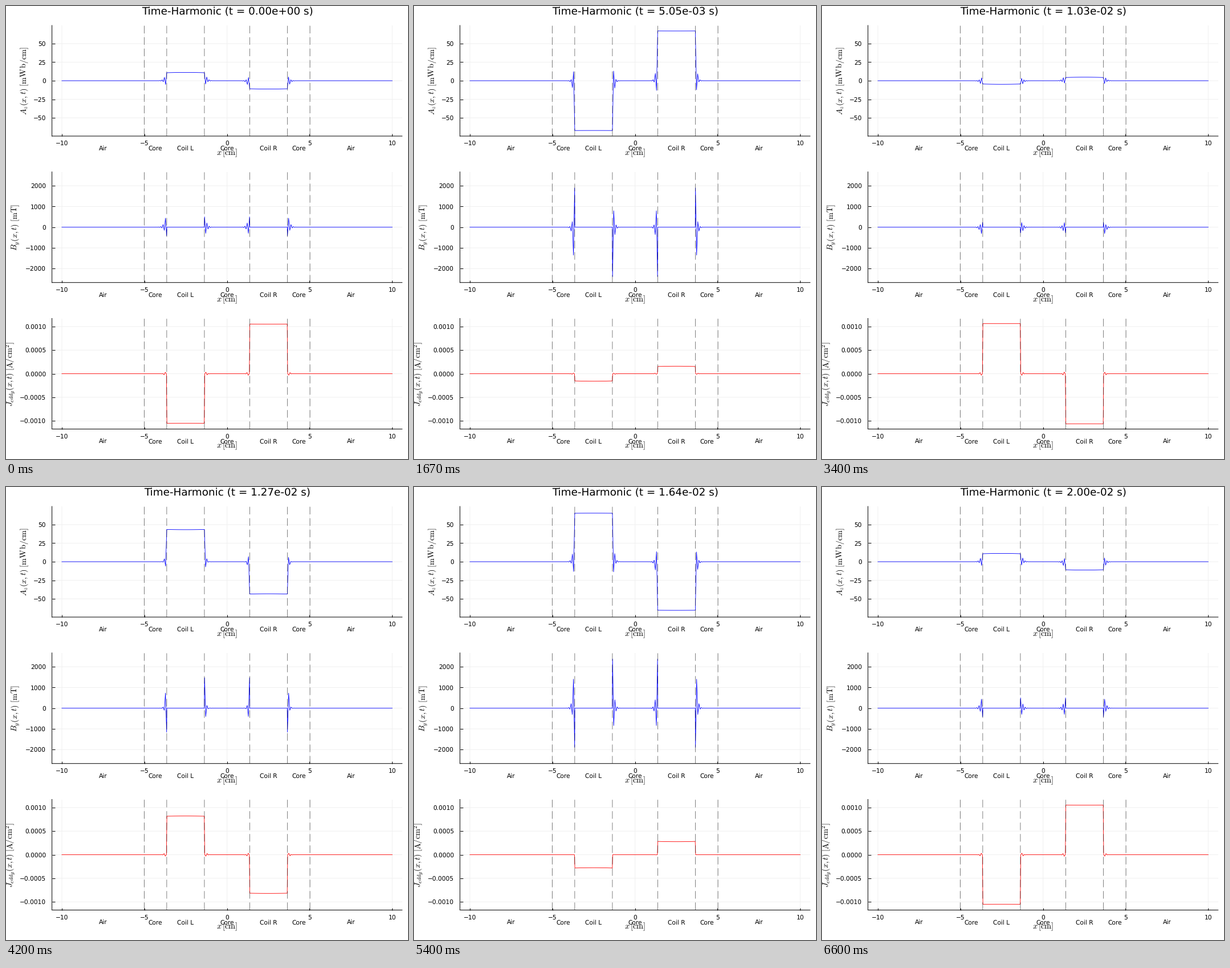
Recreate the animation shown at these times as a matplotlib script. Size 705 by 794 pixels, loop 6670 ms.

```python
import numpy as np
import matplotlib.pyplot as plt
from matplotlib.animation import FuncAnimation

W, H, DPI = 705, 794, 100
PT = 72 / DPI                      # points per pixel
FRAMES, PERIOD = 100, 0.02
PHASE = np.radians(9.17)

CORE, OUTER, INNER = 5.02, 3.65, 1.37
STEP = 0.07                        # node spacing near the coils, cm

plt.rcParams.update({"font.family": "DejaVu Sans", "mathtext.fontset": "cm",
                     "path.snap": False, "text.hinting": "none"})


def polar(size, deg):
    return size * np.exp(1j * np.radians(deg))


def tail(first, second, ratio, count=5):
    """Alternating ripple: two nodes per element, shrinking by ratio."""
    return np.array([v * ratio**j for j in range(count) for v in (first, second)])


def half(out, coil, inn, gap, start):
    """Phasors for x < 0: ripple outside, coil, ripple inside."""
    d_out = start + STEP * np.arange(len(out))
    d_in = start + STEP * np.arange(len(inn))
    coil_x = np.linspace(-OUTER + gap, -INNER - gap, len(coil))
    x = np.concatenate([[-10, -OUTER - d_out[-1] - STEP], (-OUTER - d_out)[::-1],
                        coil_x, -INNER + d_in, [-INNER + d_in[-1] + STEP, 0]])
    z = np.concatenate([[0, 0], out[::-1], coil, inn, [0, 0]])
    return x, z


def mirror(x, z, sign):
    return np.concatenate([x, -x[::-1]]), np.concatenate([z, sign * z[::-1]])


# Phasors: value(t) = Im(z exp(i psi))
AMP = 67.8
R_OUT, R_IN = polar(0.152, -17.4), polar(0.162, -18)
bow = 1 - np.linspace(-1, 1, 31) ** 2
coil_a = -AMP + 0.4j * bow
tail_out = tail(AMP * polar(0.194, -13.3), -AMP * R_OUT, R_OUT)
tail_in = tail(AMP * polar(0.202, -9.7), -AMP * R_IN, R_IN)
a_wave = mirror(*half(tail_out, coil_a, tail_in, 0, STEP), -1)

b_out = tail(1932 - 107j, -1394 + 216j, R_OUT * 1.04)
b_in = tail(-2432 + 115j, 825 - 167j, R_IN * 1.03)
b_wave = mirror(*half(b_out, np.zeros(31), b_in, 0.008, 0.008), 1)

K = 1.065e-3 / AMP
weak = 0.16
j_out = np.concatenate([[0], tail_out * weak])
j_in = np.concatenate([[0], tail_in * weak])
j_wave = mirror(*half(j_out * 1j * K, coil_a * 1j * K, j_in * 1j * K, 0.008, 0.02), -1)

fig = plt.figure(figsize=(W / DPI, H / DPI), dpi=DPI, facecolor="white")


def label(x, y, s, size=10.6, ha="center", **kw):
    return fig.text(x / W, 1 - y / H, s, fontsize=size * PT, ha=ha,
                    va="baseline", color="black", **kw)


LEFT, WIDTH, HEIGHT = 80.6, 614.1, 194
REGIONS = [("Air", -7.5), ("Core", -4.335), ("Coil L", -2.51), ("Core", 0),
           ("Coil R", 2.51), ("Core", 4.335), ("Air", 7.5)]


def panel(bottom, ylim, ticks, fmt, wave, color, name, name_x):
    ax = fig.add_axes([LEFT / W, 1 - bottom / H, WIDTH / W, HEIGHT / H])
    ax.set(xlim=(-10.6, 10.6), ylim=(-ylim, ylim),
           xticks=range(-10, 11, 5), yticks=ticks)
    ax.patch.set_visible(False)
    ax.set_axisbelow(True)
    ax.grid(color="#f0f0f0", lw=PT)
    ax.tick_params(direction="in", length=4.5 * PT, width=PT,
                   labelleft=False, labelbottom=False)
    for side in ("top", "right"):
        ax.spines[side].set_visible(False)
    for side in ("left", "bottom"):
        ax.spines[side].set_linewidth(PT)

    line, = ax.plot([], [], color=color, lw=0.85 * PT)
    for x in (-CORE, -OUTER, -INNER, INNER, OUTER, CORE):
        ax.plot([x, x], [-ylim, ylim], color="black", lw=0.5 * PT, zorder=3,
                dashes=(13.3 / 0.5, 6.7 / 0.5), dash_capstyle="butt")

    def px(x):
        return LEFT + WIDTH * (x + 10.6) / 21.2

    for x in range(-10, 11, 5):
        label(px(x), bottom + 16, str(x).replace("-", "\u2212"))
    for y in ticks:
        y_px = bottom - HEIGHT * (y + ylim) / (2 * ylim)
        label(70, y_px + 4, format(y, fmt).replace("-", "\u2212"), ha="right")
    for text, x in REGIONS:
        label(px(x), bottom + 25, text)
    label(387.2, bottom + 33.3, r"$x\,[\mathrm{cm}]$", 14.5)
    label(name_x, bottom - HEIGHT / 2, name, 14.2, rotation=90, rotation_mode="anchor")
    return line, wave


panels = [
    panel(228, 74.6, [-50, -25, 0, 25, 50], "d", a_wave, "#0000ff",
          r"$A_z(x,t)\ [\mathrm{mW\hspace{0.08}b/cm}]$", 36),
    panel(484.7, 2674, [-2000, -1000, 0, 1000, 2000], "d", b_wave, "#0000ff",
          r"$B_y(x,t)\ [\mathrm{mT}]$", 21),
    panel(741.5, 0.001174, [-0.001, -0.0005, 0.0, 0.0005, 0.001], ".4f", j_wave,
          "#ff0000", r"$J_{eddy}(x,t)\ [\mathrm{A/cm^2}]$", 11.5),
]
title = label(388.3, 16, "", 18.4)


def update(i):
    turn = i / (FRAMES - 1)
    spin = np.exp(1j * (2 * np.pi * turn - PHASE))
    for line, (x, z) in panels:
        line.set_data(x, (z * spin).imag)
    title.set_text(f"Time-Harmonic (t = {PERIOD * turn:.2e} s)")
    return [line for line, _ in panels] + [title]


# 15 frames per second
anim = FuncAnimation(fig, update, frames=FRAMES, interval=66.66,
                     repeat=True, repeat_delay=0, blit=False)
plt.show()
```
